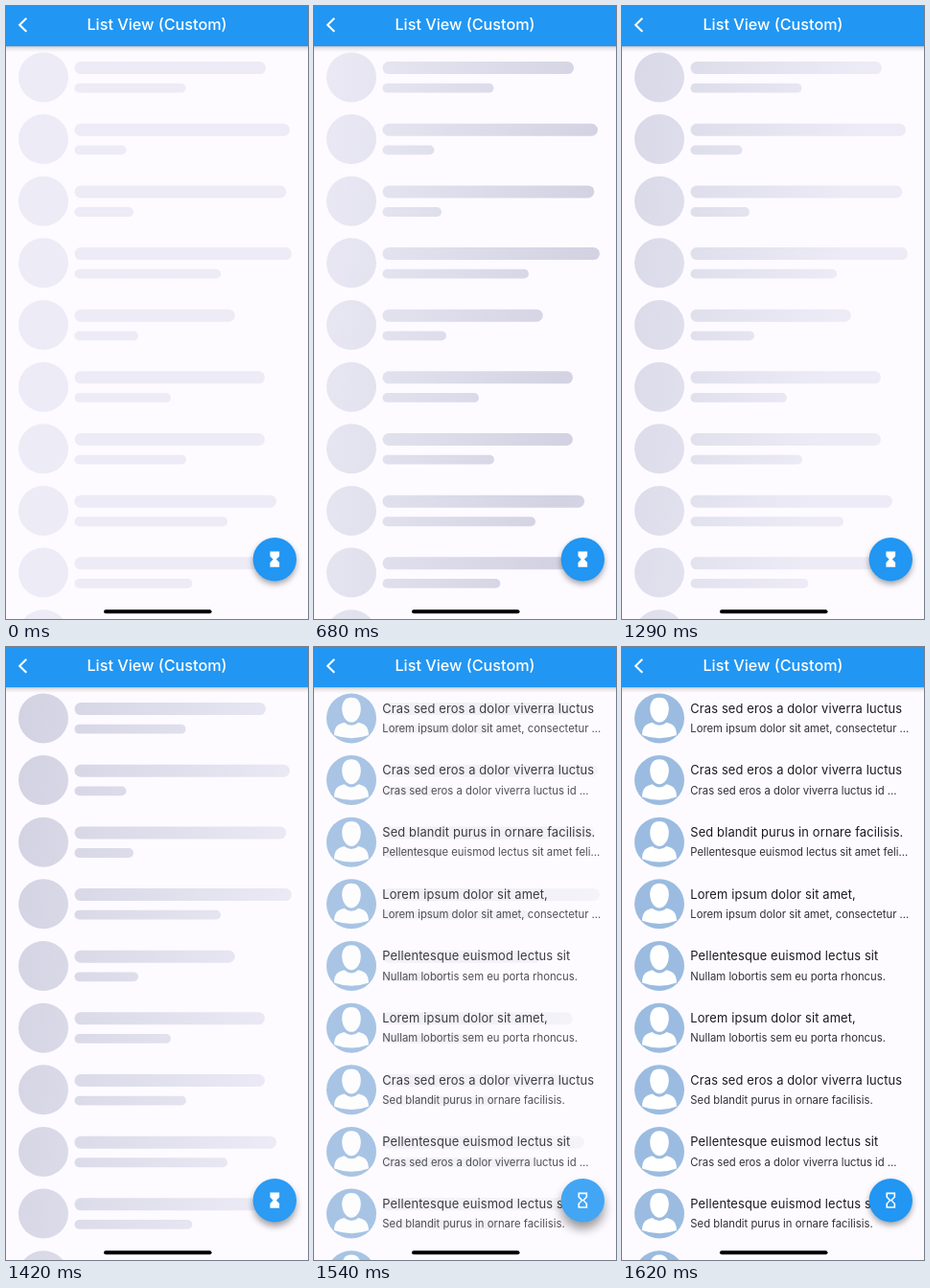
These frames come from a looping animation (315x640 px, 3470 ms). An HTML page:

```html
<!DOCTYPE html>
<html lang="en">
<head>
<meta charset="utf-8">
<title>List loading</title>
<style>
  html, body { margin: 0; width: 100%; height: 100%; overflow: hidden; background: #fdfbff; }
  svg { display: block; width: 100vw; height: 100vh; }
  text { font-family: Inter, Roboto, sans-serif; white-space: pre; }
  .title { font-size: 12.9px; letter-spacing: .13px; fill: #1b1b1f; }
  .sub { font-size: 11.3px; fill: #303034; }
  .bar { font-size: 16.2px; font-weight: 500; fill: #fff; }
</style>
</head>
<body>
<svg viewBox="0 0 315 640" preserveAspectRatio="none">
  <defs>
    <linearGradient id="shimmer" gradientUnits="userSpaceOnUse" y1="74" y2="154">
      <stop offset="0" stop-color="#ecebf6"/>
      <stop offset=".5" stop-color="#d2d2e2"/>
      <stop offset="1" stop-color="#ecebf6"/>
    </linearGradient>
    <linearGradient id="edge" x2="0" y2="1">
      <stop offset="0" stop-color="#000" stop-opacity=".22"/>
      <stop offset=".35" stop-color="#000" stop-opacity=".09"/>
      <stop offset="1" stop-color="#000" stop-opacity="0"/>
    </linearGradient>
    <filter id="blur" x="-60%" y="-60%" width="220%" height="220%">
      <feGaussianBlur id="soft" stdDeviation="3"/>
    </filter>
    <clipPath id="round"><circle cx="280.3" cy="577.7" r="22.7"/></clipPath>
    <g id="avatar">
      <circle r="26" fill="#9bbce0"/>
      <g fill="#fff">
        <path d="M0-21.7C6.5-21.7 9.8-17 9.8-10C9.8-1.5 4.8 4.2 0 4.2S-9.8-1.5-9.8-10C-9.8-17-6.5-21.7 0-21.7Z"/>
        <path d="M-7.5 4.3Q0 10.5 7.5 4.3C14 6 17.8 8.5 18 17.5Q0 24 -18 17.5C-17.8 8.5-14 6-7.5 4.3Z"/>
      </g>
    </g>
  </defs>
  <rect width="315" height="640" fill="#fdfbff"/>
  <g id="skeleton" fill="url(#shimmer)"></g>
  <g id="content"></g>

  <rect y="42" width="315" height="6" fill="url(#edge)"/>
  <rect width="315" height="42" fill="#2196f3"/>
  <path d="M21.3 12.8L14.2 19.8L21.3 26.8" fill="none" stroke="#fff" stroke-width="2.1"/>
  <text class="bar" x="157.5" y="25.3" text-anchor="middle">List View (Custom)</text>

  <circle id="shadow" cx="280.3" cy="581" r="22.5" filter="url(#blur)"/>
  <circle cx="280.3" cy="577.7" r="22.7" fill="#2196f3"/>
  <g clip-path="url(#round)" fill="#fff">
    <rect id="press" x="257" y="554" width="47" height="47"/>
    <circle id="ripple" cx="272" cy="581"/>
  </g>
  <path id="icon" transform="translate(270.6 568) scale(.808)" fill="#fff" fill-rule="evenodd"/>

  <rect x="102" y="630.2" width="112.5" height="4" rx="2"/>
</svg>
<script>
const $ = id => document.getElementById(id);
const LOOP = 3470, ROW = 64.65;
const LOREM = 'Lorem ipsum dolor sit amet,';
const CRAS = 'Cras sed eros a dolor viverra luctus';
const SED = 'Sed blandit purus in ornare facilisis.';
const PELL = 'Pellentesque euismod lectus sit';
const NULLAM = 'Nullam lobortis sem eu porta rhoncus.';

// title, subtitle, right ends of the two placeholder bars
const rows = [
  [CRAS, LOREM + ' consectetur ...', 271, 187.5],
  [CRAS, CRAS + ' id ...', 296, 125.5],
  [SED, PELL + ' amet feli...', 292.3, 133],
  [LOREM, LOREM + ' consectetur ...', 298, 224],
  [PELL, NULLAM, 238.7, 138],
  [LOREM, NULLAM, 270, 172],
  [CRAS, SED, 270, 188],
  [PELL, CRAS + ' id ...', 282, 231],
  [PELL, SED, 282, 194.3],
  ['', '', 71.5, 71.5]
];

const pill = (y, h, end) =>
  `<rect x="71.5" y="${y}" width="${end - 71.5}" height="${h}" rx="${h / 2}"/>`;

let bones = '', items = '';
rows.forEach(([title, sub, end1, end2], i) => {
  const y = 74.4 + i * ROW;
  bones += `<circle cx="39" cy="${y}" r="26"/>` + pill(y - 16.3, 13, end1) + pill(y + 6.4, 9.8, end2);
  items += `<use href="#avatar" x="39" y="${y}"/>` +
    `<text class="title" x="71.3" y="${y - 5.6}">${title}</text>` +
    `<text class="sub" x="71.3" y="${y + 14.7}">${sub}</text>`;
});
$('skeleton').innerHTML = bones;
$('content').innerHTML = items;

const glass = 'M6 2v6h.01L6 8.01 10 12l-4 4 .01.01H6V22h12v-5.99h-.01L18 16l-4-4 4-3.99-.01-.01H18V2Z';
const hollow = glass + 'M16 16.5V20H8v-3.5l4-4ZM12 11.5l-4-4V4h8v3.5Z';

// the picture only refreshes at these moments
const ticks = [0, 280, 380, 450, 530, 680, 790, 860, 930, 1000,
  1290, 1330, 1380, 1430, 1480, 1540, 1580, 1620];

const ramp = (t, a, b) => Math.min(1, Math.max(0, (t - a) / (b - a)));
const smooth = (t, a, b) => { const x = ramp(t, a, b); return x * x * (3 - 2 * x); };

function draw(t) {
  const sweep = t < 1290 ? t - 280 : t - 1290;
  const mid = -75 + sweep * .95;
  $('shimmer').setAttribute('x1', mid - 320);
  $('shimmer').setAttribute('x2', mid + 320);

  $('skeleton').setAttribute('opacity', 1 - smooth(t, 1460, 1580));
  $('content').setAttribute('opacity', smooth(t, 1450, 1570));

  const down = ramp(t, 1330, 1480) * (1 - ramp(t, 1540, 1620));
  $('soft').setAttribute('stdDeviation', 3 + 2.5 * down);
  $('shadow').setAttribute('cy', 581 + 4 * down);
  $('shadow').setAttribute('opacity', .36 + .04 * down);
  $('press').setAttribute('opacity', .13 * down);
  $('ripple').setAttribute('r', 16 * ramp(t, 1380, 1480) + 30 * ramp(t, 1480, 1540));
  $('ripple').setAttribute('opacity', .12 * down * (1 - .8 * ramp(t, 1480, 1540)));
  $('icon').setAttribute('d', t < 1480 ? glass : hollow);
}

let shown = -1;
function frame() {
  const t = performance.now() % LOOP;
  const tick = ticks.filter(k => k <= t).pop();
  if (tick !== shown) draw(shown = tick);
  requestAnimationFrame(frame);
}
frame();
</script>
</body>
</html>
```
